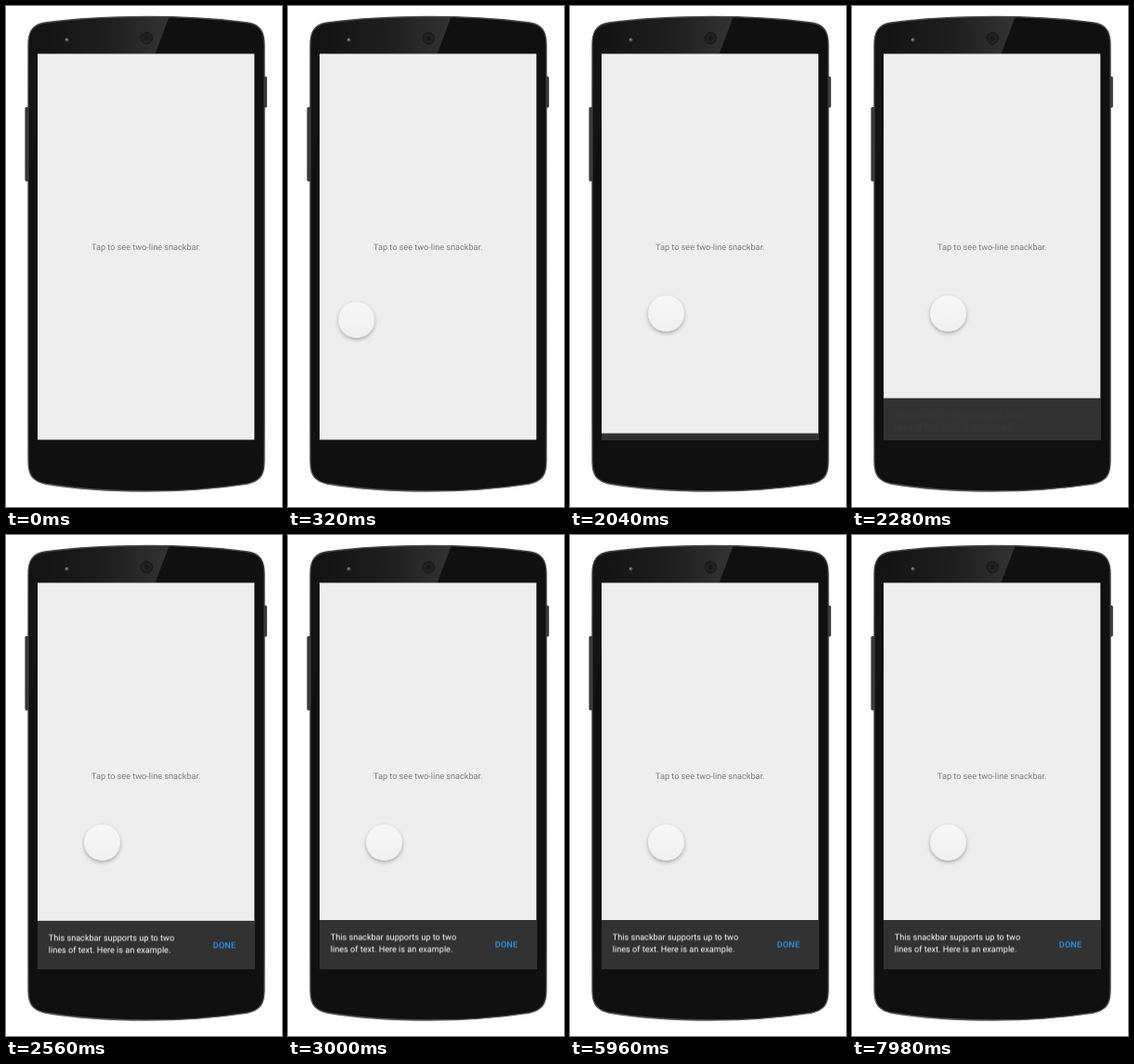
These frames come from a looping animation (297 px wide and 540 px high, 8000 ms). An HTML page:

```html
<!DOCTYPE html>
<html lang="en">
<head>
<meta charset="utf-8">
<title>Two-line snackbar</title>
<style>
  html, body { margin: 0; width: 100%; height: 100%; overflow: hidden; background: #fff; }
  svg { display: block; width: 297px; height: 540px; }
  text { font: 9.12px Roboto, sans-serif; text-rendering: geometricPrecision; }
  .action { font-weight: 500; letter-spacing: .15px; }

  .touch { animation: enter 8s infinite both; }
  .bar { animation: rise 8s infinite both; }
  .message { animation: reveal 8s linear infinite both; }

  @keyframes enter {
    0%, 1.5% { transform: translate(-128px, 29px); animation-timing-function: cubic-bezier(.215, .61, .355, 1); }
    8.25%, 100% { transform: none; }
  }
  @keyframes rise {
    0%, 25.25% { transform: translateY(52.5px); animation-timing-function: cubic-bezier(.16, 1, .3, 1); }
    37.1%, 100% { transform: none; }
  }
  @keyframes reveal {
    0%, 28.4% { opacity: 0; }
    32%, 100% { opacity: 1; }
  }
</style>
</head>
<body>
<svg viewBox="0 0 297 540">
  <defs>
    <linearGradient id="gloss" gradientUnits="userSpaceOnUse" x1="30" y1="0" x2="172" y2="0">
      <stop offset="0" stop-color="#131313"/>
      <stop offset=".55" stop-color="#1e1e1e"/>
      <stop offset="1" stop-color="#323232"/>
    </linearGradient>
    <linearGradient id="rim" x1="0" y1="0" x2="0" y2="1">
      <stop offset="0" stop-color="#484848"/>
      <stop offset=".15" stop-color="#3a3a3a"/>
      <stop offset=".85" stop-color="#3a3a3a"/>
      <stop offset="1" stop-color="#585858"/>
    </linearGradient>
    <linearGradient id="disc" x1="0" y1="0" x2="0" y2="1">
      <stop offset="0" stop-color="#f7f7f7"/>
      <stop offset="1" stop-color="#f0f0f0"/>
    </linearGradient>
    <filter id="shadow" x="-40%" y="-40%" width="180%" height="180%">
      <feDropShadow dx="0" dy="1.9" stdDeviation="2" flood-color="#000" flood-opacity=".32"/>
    </filter>
    <path id="body" d="M24 42C24 27 29 20 42 18Q90 11.5 151 11.5T260 18C273 20 278 27 278 42V491C278 506 273 512 260 515Q212 523 151 523T42 515C29 512 24 506 24 491Z"/>
    <clipPath id="inside"><use href="#body"/></clipPath>
    <clipPath id="screen"><rect x="34" y="51.5" width="233.3" height="416"/></clipPath>
  </defs>

  <g fill="#3a3a3a" stroke="#242424" stroke-width=".6">
    <rect x="20.8" y="109.3" width="4" height="79.4" rx="1"/>
    <rect x="277.5" y="76.3" width="3" height="32.9" rx="1"/>
  </g>

  <use href="#body" fill="#101010"/>
  <path d="M20 8H177L160.5 51.5H34V120L20 220Z" fill="url(#gloss)" clip-path="url(#inside)"/>
  <use href="#body" fill="none" stroke="url(#rim)" stroke-width="1.3"/>

  <circle cx="151.3" cy="34.7" r="6.3" fill="#202020" stroke="#161616" stroke-width=".8"/>
  <circle cx="151.3" cy="34.7" r="3.3" fill="#191919" stroke="#2c2c2c" stroke-width=".7"/>
  <circle cx="65.5" cy="36.5" r="2.6" fill="#555" stroke="#111"/>
  <circle cx="65" cy="36" r="1" fill="#888"/>

  <g clip-path="url(#screen)">
    <rect x="34" y="51" width="234" height="417" fill="#eee"/>
    <text x="92" y="262.5" fill="#7c7c7c">Tap to see two-line snackbar.</text>
    <g class="bar">
      <rect x="34" y="415" width="234" height="53" fill="#323232"/>
      <g class="message">
        <g fill="#fff">
          <text x="45.8" y="436.7">This snackbar supports up to two</text>
          <text x="45.8" y="449.6">lines of text. Here is an example.</text>
        </g>
        <text class="action" x="222.8" y="444.4" fill="#2b98f0">DONE</text>
      </g>
    </g>
  </g>

  <g class="touch">
    <circle cx="103.5" cy="331.5" r="19.3" fill="url(#disc)" filter="url(#shadow)"/>
  </g>
</svg>
</body>
</html>
```
